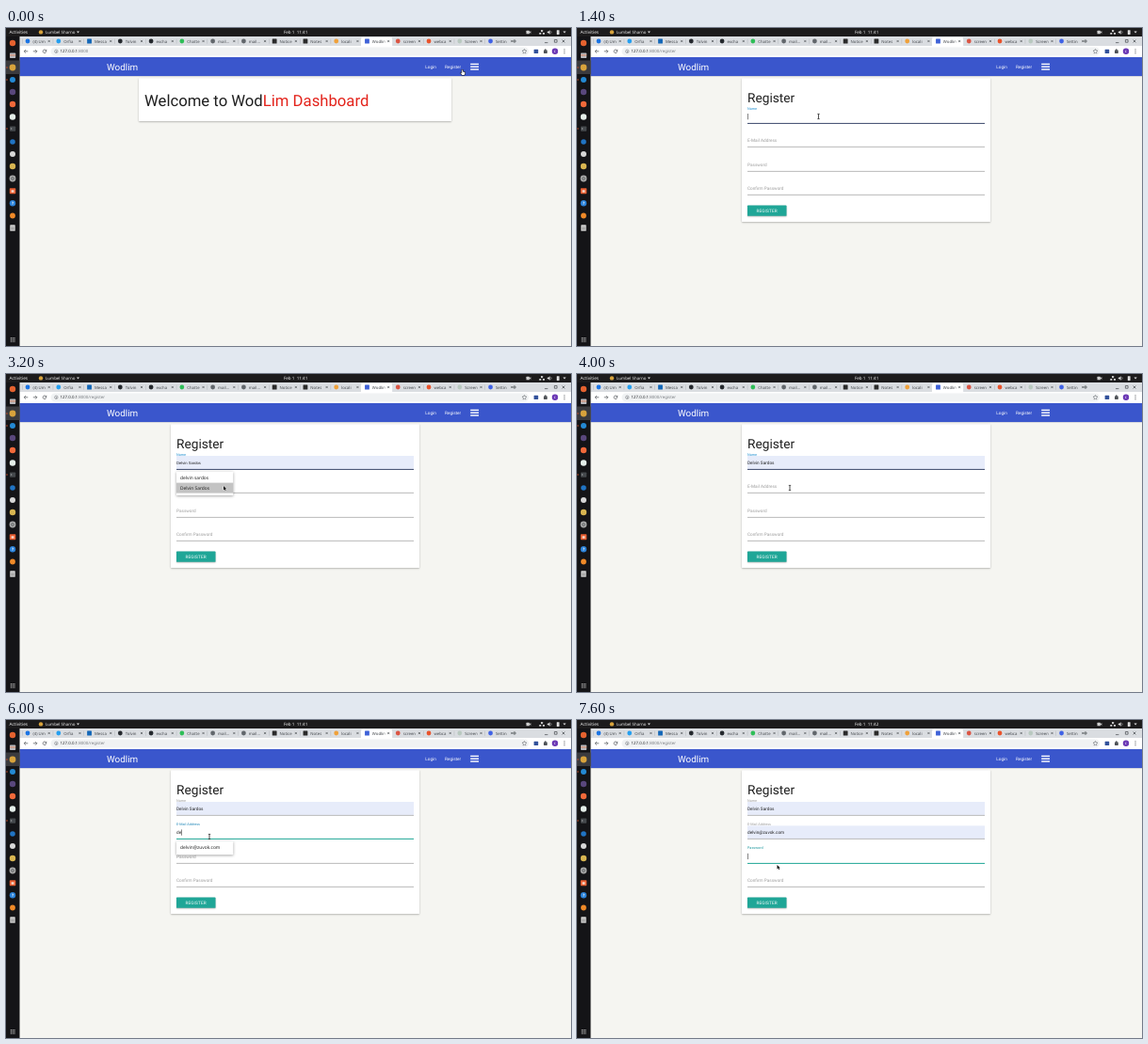
Write an HTML page with a canvas that moves like this. It is 600x338 px and loops after 8 s.

```html
<!DOCTYPE html>
<html lang="en">
<head>
<meta charset="utf-8">
<title>Registration form</title>
<style>
html, body { margin: 0; width: 100%; height: 100%; overflow: hidden; background: #f5f5f1; }
canvas { display: block; width: 600px; height: 338px; }
</style>
</head>
<body>
<canvas id="stage"></canvas>
<script>
const LOOP = 8000, STEP = 200;
const canvas = document.getElementById('stage');
const ctx = canvas.getContext('2d');
const dpr = Math.max(1, window.devicePixelRatio || 1);
canvas.width = 600 * dpr;
canvas.height = 338 * dpr;

const ROBOTO = 'Roboto, sans-serif';
const ARIAL = '"Liberation Sans", Arial, sans-serif';
const UI = '"Noto Sans", "Open Sans", sans-serif';
const PERSON = 'Delvin Sardos', MAIL = 'delvin@zuvok.com';
const OTHER = 'Dessinia ukob', OTHER_MAIL = 'dessiniaukob27@zuvok.com';

// ---------- drawing helpers ----------
function rect(x, y, w, h, color) {
  ctx.fillStyle = color;
  ctx.fillRect(x, y, w, h);
}

function round(x, y, w, h, r, color) {
  ctx.fillStyle = color;
  ctx.beginPath();
  ctx.roundRect(x, y, w, h, r);
  ctx.fill();
}

function dot(x, y, r, color) {
  ctx.fillStyle = color;
  ctx.beginPath();
  ctx.arc(x, y, r, 0, Math.PI * 2);
  ctx.fill();
}

function line(points, color, width = 0.7) {
  ctx.strokeStyle = color;
  ctx.lineWidth = width;
  ctx.beginPath();
  points.forEach(([x, y], i) => i ? ctx.lineTo(x, y) : ctx.moveTo(x, y));
  ctx.stroke();
}

function poly(points, color, edge, width = 0.8) {
  ctx.beginPath();
  points.forEach(([x, y], i) => i ? ctx.lineTo(x, y) : ctx.moveTo(x, y));
  ctx.closePath();
  if (edge) {
    ctx.strokeStyle = edge;
    ctx.lineWidth = width;
    ctx.lineJoin = 'round';
    ctx.stroke();
  }
  ctx.fillStyle = color;
  ctx.fill();
}

// Laid out large and scaled down so that tiny sizes keep exact spacing.
function text(str, x, y, size, color, font = ROBOTO, weight = 400, spacing = 0) {
  const k = 8;
  ctx.save();
  ctx.translate(x, y);
  ctx.scale(1 / k, 1 / k);
  ctx.font = `${weight} ${size * k}px ${font}`;
  ctx.letterSpacing = spacing * k + 'px';
  ctx.textRendering = 'geometricPrecision';
  ctx.fillStyle = color;
  ctx.fillText(str, 0, 0);
  const width = ctx.measureText(str).width / k;
  ctx.restore();
  return width;
}

function raised(x, y, w, h, r, color, blur = 2, alpha = 0.3) {
  ctx.save();
  ctx.shadowColor = `rgba(0,0,0,${alpha})`;
  ctx.shadowBlur = blur * dpr;
  ctx.shadowOffsetY = 0.7 * dpr;
  round(x, y, w, h, r, color);
  ctx.restore();
}

function cross(x, y, r, color, width = 0.6) {
  line([[x - r, y - r], [x + r, y + r]], color, width);
  line([[x + r, y - r], [x - r, y + r]], color, width);
}

// ---------- desktop ----------
function topBar(t) {
  rect(0, 0, 600, 9, '#1c1b1c');
  text('Activities', 3.5, 6, 4.7, '#f0f0f0', UI);
  dot(37, 4.4, 2.2, '#d8a33c');
  text('Lumbel Sharno', 42, 6, 4.4, '#f0f0f0', UI);
  poly([[75, 3.6], [78, 3.6], [76.5, 5.5]], '#ddd');
  text(t < 6200 ? 'Feb 1  11:41' : 'Feb 1  11:42', 295, 6, 4.5, '#f4f4f4', UI);
  const cam = t >= 600 && t < 1000 ? '#e06050' : '#cfcfcf';
  round(552.5, 2.7, 3.4, 3.6, 0.5, cam);
  poly([[555.7, 4.5], [557.3, 3], [557.3, 6]], cam);
  rect(568, 2.2, 2.2, 1.7, '#ddd');
  rect(566.3, 5, 2, 1.7, '#ddd');
  rect(570, 5, 2, 1.7, '#ddd');
  line([[569.1, 3.5], [569.1, 4.5]], '#ddd', 0.5);
  poly([[574.8, 3.7], [576, 3.7], [577.6, 2.2], [577.6, 6.8], [576, 5.3], [574.8, 5.3]], '#ddd');
  line([[578.6, 3.2], [579.2, 4.5], [578.6, 5.8]], '#ddd', 0.5);
  round(584.8, 2.2, 2.8, 4.8, 0.4, '#ddd');
  poly([[591.5, 3.6], [594.7, 3.6], [593.1, 5.5]], '#ddd');
}

function dock() {
  rect(0, 9, 14.5, 329, '#141417');
  rect(0, 34.5, 14.5, 14.5, '#3b3b3e');
  [42, 55, 107].forEach(y => dot(1, y, 0.7, '#e2552b'));
  dot(7, 16, 3.2, '#e5622f');
  round(4, 26.5, 6.2, 5.4, 0.7, '#b9b9bd');
  rect(4, 28.6, 6.2, 0.7, '#e8703c');
  dot(7, 42, 3.4, '#d8a33c');
  dot(7, 55, 3, '#2489d3');
  dot(7, 68, 3.2, '#59477c');
  dot(7, 81, 3.2, '#f1693a');
  dot(7, 94.5, 3.2, '#e4eee9');
  round(4, 104.5, 6.2, 5.2, 0.7, '#44484c');
  line([[5.2, 106.2], [6.2, 107], [5.2, 107.8]], '#ddd', 0.5);
  dot(7, 121, 2.8, '#2074c4');
  dot(7, 134, 3, '#d7d7d7');
  dot(7, 147, 3.2, '#d8b551');
  dot(7, 160, 3.4, '#aaa');
  dot(7, 160, 1.7, '#55585a');
  dot(7, 160, 0.8, '#ccc');
  round(3.8, 170.3, 6.5, 6, 0.8, '#e95f32');
  rect(5.6, 172.3, 2.9, 2.4, '#f7dfd2');
  dot(7, 186.3, 3.2, '#2b82d9');
  text('?', 6, 188, 4.6, '#fff', UI, 700);
  dot(7, 199.5, 2.9, '#f08a28');
  round(4.3, 209.2, 5.4, 6.5, 0.5, '#d9d9d9');
  for (let y = 210.8; y < 215; y += 1.3) rect(5.2, y, 3.6, 0.5, '#777');
  for (let i = 0; i < 9; i++) {
    rect(4.8 + i % 3 * 1.8, 329 + Math.floor(i / 3) * 1.8, 1.1, 1.1, '#c4c4c4');
  }
}

// ---------- browser frame ----------
const TABS = [
  ['(4) Um', '#1b74e4'], ['Orfia', '#259ff0'], ['Messa', '#1267b8', 1], ['Tolvin', '#25292e'],
  ['excha', '#25292e'], ['Chatte', '#2fbe58'], ['mail…', '#62676c'], ['mail…', '#62676c'],
  ['Notice', '#2b2b2b', 1], ['Notes', '#2b2b2b', 1], ['locali', '#efa13b'], ['Wodlim', '#3f62d8', 1],
  ['screen', '#db5544'], ['webca', '#e9542c'], ['Screen', '#b9c9c0'], ['Settin', '#4063e6']
];

function tabs(loading) {
  rect(14.5, 9, 585.5, 10.5, '#dadde1');
  TABS.forEach(([name, color, square], i) => {
    const x = 23 + i * 32.77, active = i === 11;
    if (active) round(x - 6.5, 9.8, 33.2, 10, [2, 2, 0, 0], '#fff');
    else if (i !== 12) rect(x - 6, 11.7, 0.4, 5, '#a9adb2');
    if (active && loading) {
      ctx.strokeStyle = color;
      ctx.lineWidth = 0.9;
      ctx.beginPath();
      ctx.arc(x, 14, 2, -1, 3.2);
      ctx.stroke();
    } else if (square) round(x - 2.4, 11.6, 4.8, 4.8, 0.5, color);
    else dot(x, 14, 2.4, color);
    ctx.save();
    ctx.beginPath();
    ctx.rect(x + 5, 10, 14, 8);
    ctx.clip();
    text(name, x + 5.4, 15.6, 4.3, '#45494e', UI);
    ctx.restore();
    cross(x + 22.7, 14, 1.1, '#3f4347');
  });
  line([[538, 14], [542, 14]], '#44484c');
  line([[540, 12], [540, 16]], '#44484c');
  line([[572, 15.6], [575.4, 15.6]], '#44484c');
  ctx.strokeRect(582.4, 12.5, 2.7, 2.7);
  cross(592, 14, 1.4, '#44484c', 0.7);
}

function toolbar(t, loading) {
  rect(14.5, 19, 585.5, 12, '#fff');
  line([[23.3, 24.8], [19.2, 24.8]], '#4f5358');
  line([[21, 23], [19.2, 24.8], [21, 26.6]], '#4f5358');
  line([[28.8, 24.8], [32.9, 24.8]], '#4f5358');
  line([[31.1, 23], [32.9, 24.8], [31.1, 26.6]], '#4f5358');
  if (loading) cross(41, 24.8, 1.7, '#4f5358', 0.7);
  else {
    ctx.strokeStyle = '#4f5358';
    ctx.lineWidth = 0.7;
    ctx.beginPath();
    ctx.arc(41, 24.8, 1.8, 0.3, 5.4);
    ctx.stroke();
    poly([[43.2, 22.6], [43.2, 24.7], [41.2, 24.7]], '#4f5358');
  }
  round(47.5, 20.4, 507.5, 8.9, 4.4, '#f0f2f3');
  ctx.strokeStyle = '#5f6368';
  ctx.lineWidth = 0.5;
  ctx.beginPath();
  ctx.arc(53.3, 24.8, 1.7, 0, 7);
  ctx.stroke();
  rect(53, 24.4, 0.6, 1.5, '#5f6368');
  const w = text('127.0.0.1', 57.5, 26.4, 4.4, '#25282c', UI);
  text(t < 600 ? ':8000' : ':8000/register', 57.5 + w, 26.4, 4.4, '#777b80', UI);

  const star = [];
  for (let i = 0; i < 10; i++) {
    const a = i * Math.PI / 5 - Math.PI / 2, r = i % 2 ? 1 : 2.3;
    star.push([550.5 + r * Math.cos(a), 25 + r * Math.sin(a)]);
  }
  poly(star, '#f0f2f3', '#4f5358', 0.9);
  round(560.6, 22.8, 4.6, 4.2, 0.6, '#33529b');
  round(571, 23.4, 3.8, 3.6, 0.4, '#4f5358');
  dot(572.8, 23.2, 0.9, '#4f5358');
  dot(583, 24.8, 3.2, '#6a37b4');
  text('c', 581.8, 26.2, 4.2, '#fff', UI);
  [22.8, 24.8, 26.8].forEach(y => dot(593, y, 0.6, '#4f5358'));
}

// ---------- page ----------
function navBar(font, icon) {
  rect(14.5, 31, 585.5, 20, '#3a56cc');
  rect(14.5, 51, 585.5, 0.7, '#c9ccd6');
  text('Wodlim', 107, 44.5, 9.84, '#fff', font);
  text('Login', 445.2, 42.7, 4.69, '#fff', font);
  text('Register', 466, 42.7, 4.69, '#fff', font);
  if (icon) [37.7, 40.5, 43.3].forEach(y => rect(493.2, y, 8.8, 1.4, '#fff'));
}

function welcome() {
  raised(141, 53.3, 332, 45.7, 0.6, '#fff');
  const w = text('Welcome to Wod', 147, 83, 16.69, '#1f1f1f');
  text('Lim Dashboard', 147 + w, 83, 16.69, '#e3231b');
}

const LABELS = ['Name', 'E-Mail Address', 'Password', 'Confirm Password'];
const FLOAT_AT = [1000, 4400, 7200, Infinity];
const FOCUS_LABEL = ['#1f8fd0', '#2087b8', '#17949a'];
const fieldY = i => 101 + i * 25.4;

// Returns what a field holds: typed text, a preview or the chosen entry.
function content(i, t) {
  if (i === 0) {
    if (t >= 3600) return { str: PERSON, fill: true };
    if (t >= 3200) return { str: PERSON, fill: true, preview: true };
    if (t >= 3000) return { str: PERSON.toLowerCase(), fill: true, preview: true };
    return { str: t >= 2600 ? 'De' : t >= 2400 ? 'D' : '' };
  }
  if (i === 1) {
    if (t >= 6800) return { str: MAIL, fill: true };
    if (t >= 6400) return { str: MAIL, fill: true, preview: true };
    return { str: t >= 6000 ? 'de' : t >= 5800 ? 'd' : '' };
  }
  return { str: '' };
}

function field(i, t, font, focus) {
  const y = fieldY(i), active = i === focus, up = t >= FLOAT_AT[i];
  const { str, fill, preview } = content(i, t);
  if (fill) rect(181, y - 14, 252, 14, '#e7ecfa');
  const underline = !active || t < 1000 ? '#b4b4b4' : i ? '#35afa0' : '#4c5878';
  rect(181, Math.round(y) - 0.1, 252, active && t >= 1000 ? 1.1 : 0.9, underline);
  const tint = active ? FOCUS_LABEL[i] : '#9c9c9c';
  if (up) text(LABELS[i], 181, y - 14.4, 3.75, tint, font);
  else text(LABELS[i], 181, y - 5.3, 4.69, tint, font);
  let w = 0;
  if (str) {
    w = preview ? text(str, 181, y - 5.4, 4.17, '#222', ARIAL)
                : text(str, 181, y - 5.3, 4.69, '#222', font);
  }
  const start = i === 1 ? 4400 : FLOAT_AT[i];
  const blinkOn = i === 1 && t < 5800 ? Math.floor((t - start) / 500) % 2 === 0 : true;
  if (active && !fill && blinkOn) rect(181.2 + w, y - 10, 0.6, 6.3, '#333');
}

function profileMenu(y, w, first, second) {
  raised(181, y, w, 34.6, 0.5, '#fff', 3, 0.4);
  text(first, 185, y + 7.8, 4.85, '#222', UI, 500);
  text(second, 185, y + 15, 4.5, '#333', UI);
  rect(181, y + 21.4, w, 0.5, '#dcdcdc');
  text('Manage…', 185, y + 29.6, 4.9, '#222', UI);
}

function listMenu(y, rows, picked) {
  raised(181, y, 60.3, rows.length * 11 + 3.4, 0.5, '#fff', 3, 0.4);
  rows.forEach((row, i) => {
    const top = y + 0.9 + i * 11;
    if (i === picked) rect(181, top, 60.3, 11, '#c3c3c3');
    text(row, 185, top + 7.3, 4.85, '#222', UI, 500);
  });
}

function menus(t) {
  if (t >= 1800 && t < 2600) profileMenu(103.5, 71.5, OTHER, OTHER_MAIL);
  else if (t >= 2600 && t < 3600) {
    listMenu(103.7, [PERSON.toLowerCase(), PERSON], t >= 3200 ? 1 : t >= 3000 ? 0 : -1);
  } else if (t >= 4600 && t < 5800) profileMenu(128.9, 75.2, OTHER_MAIL, OTHER);
  else if (t >= 5800 && t < 6800) listMenu(128.8, [MAIL], t >= 6400 ? 0 : -1);
}

function registerForm(t, font, ready) {
  raised(175, 53.3, 264, 152.7, 0.6, '#fff');
  text('Register', 181, 78.8, 13.69, '#1f1f1f', font);
  const focus = t < 4400 ? 0 : t < 7200 ? 1 : 2;
  LABELS.forEach((_, i) => field(i, t, font, focus));
  raised(181, 188.6, ready ? 41.5 : 44.1, 11.2, 0.6, '#1fa697', 1.5);
  text('REGISTER', 190.4, 195.9, 4.69, '#fff', font, 400, 0.156);
  menus(t);
}

// ---------- pointer ----------
const PATH = [
  [0, 485, 47, 'hand'], [400, 485, 47, 'hand'], [800, 457, 53, 'hand'], [1000, 365, 75, 'arrow'],
  [1200, 255, 93, 'beam'], [2000, 261, 97, 'beam'], [2800, 261, 97, 'beam'], [3000, 240, 109, 'arrow'],
  [3200, 231, 119, 'arrow'], [3600, 230, 119, 'arrow'], [4000, 226, 121, 'beam'], [4800, 220, 120, 'beam'],
  [5800, 220, 120, 'beam'], [6200, 212, 128, 'arrow'], [6600, 208, 132, 'arrow'], [6800, 208, 132, 'arrow'],
  [7000, 210, 140, 'beam'], [7400, 212.5, 153, 'arrow'], [7600, 212.5, 154, 'arrow'], [LOOP, 212.5, 154, 'arrow']
];

function pointer(t) {
  const n = PATH.findIndex(p => p[0] > t);
  const a = PATH[n - 1], b = PATH[n], u = (t - a[0]) / (b[0] - a[0]);
  ctx.save();
  ctx.translate(a[1] + (b[1] - a[1]) * u, a[2] + (b[2] - a[2]) * u);
  if (a[3] === 'arrow') {
    poly([[0, 0], [0, 4.5], [1.1, 3.6], [1.9, 5.2], [2.6, 4.8], [1.9, 3.3], [3.3, 3.2]], '#111', '#fff');
  } else if (a[3] === 'beam') {
    line([[-1.2, -2.6], [1.2, -2.6]], '#222', 0.7);
    line([[0, -2.6], [0, 2.6]], '#222', 0.8);
    line([[-1.2, 2.6], [1.2, 2.6]], '#222', 0.7);
  } else {
    poly([[-0.8, -2.5], [0, -2.5], [0.2, -0.6], [2.3, 0], [2.3, 1.7], [1.6, 3],
          [-0.7, 3], [-2, 0.9], [-1.6, 0.4], [-0.8, 1]], '#fff', '#111', 1.1);
  }
  ctx.restore();
}

// ---------- scene ----------
function draw(t) {
  const loading = t >= 200 && t < 1000, ready = t < 600 || t >= 1000;
  const font = ready ? ROBOTO : ARIAL;
  ctx.setTransform(dpr, 0, 0, dpr, 0, 0);
  rect(0, 0, 600, 338, '#f5f5f1');
  if (t < 600) welcome();
  else registerForm(t, font, ready);
  navBar(font, ready);
  tabs(loading);
  toolbar(t, loading);
  dock();
  topBar(t);
  pointer(t);
}

const begin = performance.now();
function tick() {
  const t = (performance.now() - begin) % LOOP;
  draw(Math.floor(t / STEP) * STEP);
  requestAnimationFrame(tick);
}
tick();
</script>
</body>
</html>
```
